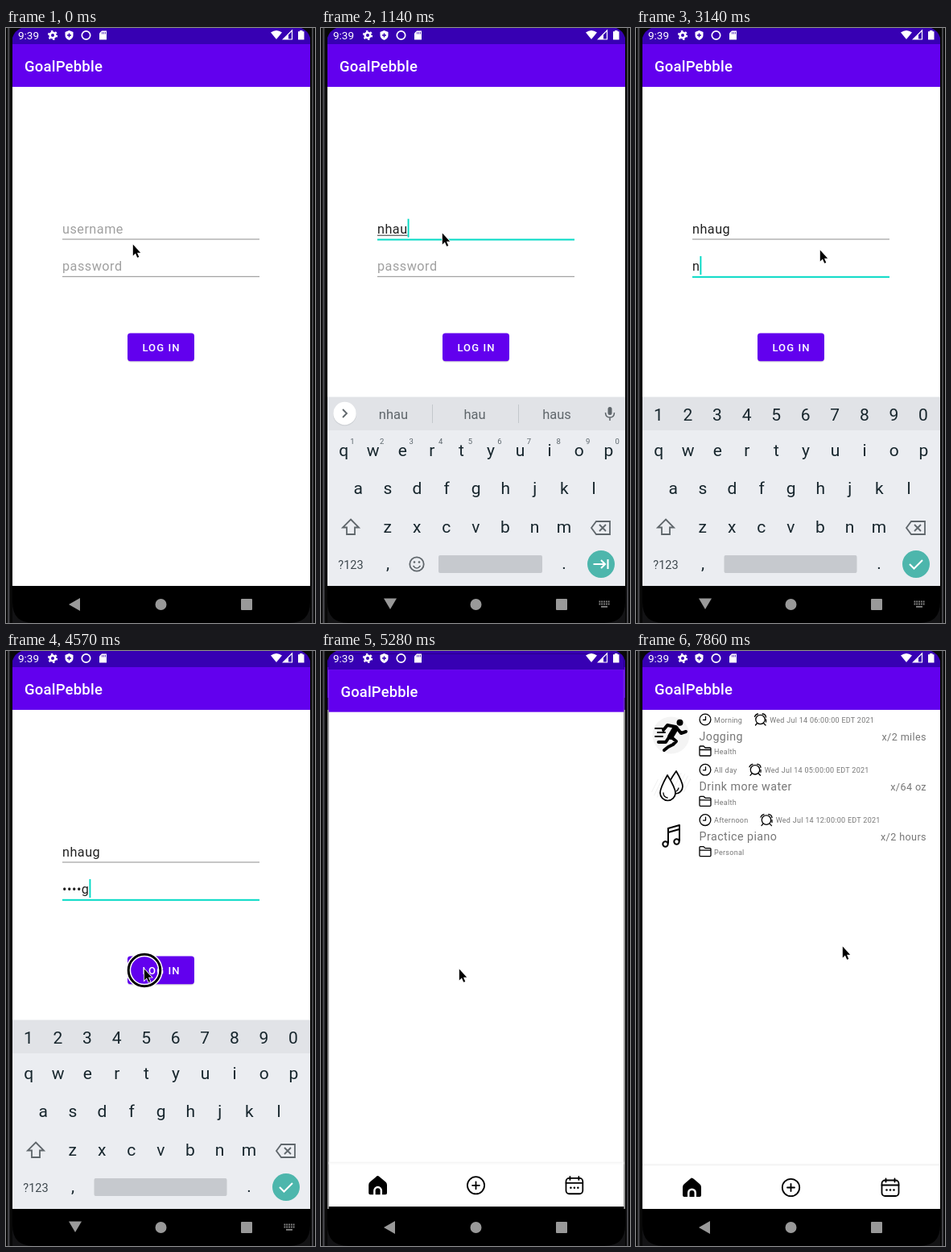
An HTML page that plays this animation: 384 px wide and 738 px high, repeating every 8000 ms.

```html
<!DOCTYPE html>
<html lang="en">
<head>
<meta charset="utf-8">
<title>Habit app</title>
<style>
html, body { margin: 0; width: 100%; height: 100%; overflow: hidden; background: #000; }
svg { display: block; width: 384px; height: 738px; font-family: Roboto, "Noto Sans", sans-serif; }
text { white-space: pre; }
.mid { text-anchor: middle; }
.end { text-anchor: end; }
.title { font-size: 18.5px; font-weight: 500; letter-spacing: .2px; fill: #fff; }
.field { font-size: 16.2px; letter-spacing: .03125em; fill: #212121; }
.hint { fill: #a0a0a0; }
.button { font-size: 13px; font-weight: 500; letter-spacing: 1.1px; fill: #fff; }
.key { font-size: 21px; fill: #17262d; }
.sup { font-size: 9.5px; fill: #5c666c; }
.word { font-size: 16.5px; fill: #5f666b; }
.small, .name, .goal { letter-spacing: .03125em; fill: #777; }
.small { font-size: 9px; }
.name { font-size: 14.25px; }
.goal { font-size: 12.6px; }
</style>
</head>
<body>
<svg id="stage" viewBox="0 0 384 738"></svg>
<script>
const APP = "GoalPebble", USER = "nhaug";
const TICKS = 56, TICK_RATE = 7;
const DARK = "#3700b3", PURPLE = "#6200ee", TEAL = "#03dac5", GREY = "#5f666b";

const tag = (name, attrs, body = "") =>
  `<${name} ${Object.entries(attrs).map(([k, v]) => `${k}="${v}"`).join(" ")}>${body}</${name}>`;
const rect = (x, y, width, height, fill, rx = 0, more = {}) =>
  tag("rect", { x, y, width, height, fill, rx, ...more });
const disc = (cx, cy, r, fill, more = {}) => tag("circle", { cx, cy, r, fill, ...more });
const path = (d, more = {}) => tag("path", { d, ...more });
const text = (x, y, cls, body, more = {}) => tag("text", { x, y, class: cls, ...more }, body);
const group = (body, more = {}) => tag("g", more, body);
const at = (x, y, body) => group(body, { transform: `translate(${x} ${y})` });
const pen = (width, stroke = "#000") => ({
  fill: "none", stroke, "stroke-width": width, "stroke-linecap": "round", "stroke-linejoin": "round",
});
const line = (d, width = 1.3, color) => path(d, pen(width, color));
const ring = (x, y, r, width = 1.3, color) => disc(x, y, r, "none", pen(width, color));
const tool = (d, width = 1.8) => path(d, { fill: "none", stroke: GREY, "stroke-width": width });

const appBar = () => rect(8, 0, 370, 20.5, DARK) + rect(8, 20, 370, 53, PURPLE)
  + text(23, 54, "title", APP);

const statusIcons = () => text(15, 13.8, "", "9:39", { "font-size": 13.5, fill: "#fff" })
  + ring(58, 9, 3.3, 2.6, "#fff")
  + disc(58, 9, 5.2, "none", { stroke: "#fff", "stroke-width": 1.8, "stroke-dasharray": "2.4 3.05" })
  + path("M78.5 3l5 2v4q0 4-5 6q-5-2-5-6V5z", { fill: "#fff" })
  + path("M78.5 6.5v5M76 9h5", { stroke: DARK, "stroke-width": 1.5 })
  + ring(99.5, 9, 5.2, 1.7, "#fff")
  + path("M119 3.5h6v11h-9V6.5z", { fill: "#fff" })
  + path("M119.5 5v2.5M121.5 5v2.5M123.5 5v2.5", { stroke: DARK, "stroke-width": .8 })
  + path("M329 5.5q7-5 14 0l-7 8.5z", { fill: "#fff" })
  + path("M355.5 3v11h-11z", { fill: "none", stroke: "#fff", "stroke-width": 1.2 })
  + path("M351 8v6h-6z", { fill: "#fff" })
  + path("M365 3h3.5v1.3h2v10.2h-7.5V4.3h2z", { fill: "#fff" });

const keyboardTools = () => at(79, 478, ring(-2, -2, 5, 1.8, GREY) + tool("M2 2L8 8"))
  + at(132, 478, tool("M-7 -7H7V3L3 7H-7zM7 3H3V7M-3 1q3 3 6 0", 1.6)
    + disc(-3, -2.5, 1, GREY) + disc(3, -2.5, 1, GREY))
  + text(185.5, 482.5, "mid", "GIF", { "font-size": 12, "font-weight": 700, fill: GREY })
  + rect(233, 471, 15, 15, "#70777c", 1)
  + path("M273.5 468V488", { stroke: "#c3c7cb" })
  + [301, 307, 313].map(x => disc(x, 478.5, 2, GREY)).join("");

const enterCircle = icon => disc(348, 665, 17, "#4db6ac")
  + path(icon, { fill: "none", stroke: "#fff", "stroke-width": 2.1 });

function keyboard(typed, secret) {
  const step = 36.58;
  const row = (keys, x, y) => [...keys].map((c, i) => text(x + i * step, y, "key mid", c)).join("");
  let out = rect(8, 457, 370, 2, "#f2f3f5") + rect(8, 458, 370, 235, "#ebedf1") + rect(8, 458, 370, 41, "#e1e3e7");
  if (secret) out += row("1234567890", 27.8, 486.5);
  else {
    out += disc(29.5, 479, 14.5, "#cfd2d6") + disc(29.5, 478, 14.2, "#fff")
      + tool(typed ? "M27 473l5 5l-5 5" : "M32 473l-5 5l5 5")
      + rect(356.5, 470, 5, 10, GREY, 2.5)
      + tool("M353.5 477q0 6 5.5 6t5.5-6M359 483v4", 1.5);
    if (typed) {
      const rest = typed.slice(1) || typed;
      [[90, typed], [191, rest], [293, rest + "s"]].forEach(([x, w]) => out += text(x, 485, "word mid", w));
      out += path("M138.5 467V490M245.5 467V490", { stroke: "#c3c7cb" });
    } else out += keyboardTools();
    out += [..."1234567890"].map((c, i) => text(39 + i * step, 515.5, "sup mid", c)).join("");
  }
  out += row("qwertyuiop", 28.1, 530.5) + row("asdfghjkl", 46.3, 577.5) + row("zxcvbnm", 82.6, 625.5)
    + tool("M37 609.5l10 10h-5v8.5h-10v-8.5h-5z")
    + tool("M336 620l6-8h17v16h-17zM346 616l8 8M354 616l-8 8")
    + text(37, 670.5, "mid", "?123", { "font-size": 14.5, fill: "#3f494f" })
    + text(83, 671, "key mid", ",") + text(302, 671, "key mid", ".");
  if (secret) out += rect(109.5, 654, 165, 22, "#c6c9ce", 2) + enterCircle("M340 665l5.5 5.5L356 660");
  else {
    out += rect(146, 654, 129, 22, "#c6c9ce", 2)
      + at(119, 665, ring(0, 0, 8.7, 1.8, GREY) + disc(-3, -2.5, 1.3, GREY) + disc(3, -2.5, 1.3, GREY)
        + tool("M-4.5 2q4.5 6 9 0", 1.5))
      + enterCircle("M338.5 665h14M348 660l5 5l-5 5M356.5 659v12");
  }
  return out;
}

const ctx = document.createElement("canvas").getContext("2d");
function measure(s) {
  ctx.font = "16.2px Roboto, 'Noto Sans', sans-serif";
  return ctx.measureText(s).width + s.length * .506;
}

function field(y, hint, value, active, caret, composing) {
  const w = measure(value);
  return text(70, y, value ? "field" : "field hint", value || hint)
    + (composing && value ? rect(70, y + 2, w, 1, "#333") : "")
    + (active ? rect(70, y + 6.8, 245, 2, TEAL) : rect(70, y + 6.8, 245, 1, "#8d8d8d"))
    + (active && caret ? rect(70 + w, y - 18, 1.9, 23, TEAL) : "");
}

const login = s => rect(8, 0, 370, 692, "#fff") + appBar()
  + field(254.7, "username", s.user, s.focus === 1, s.caret, s.focus === 1)
  + field(301, "password", s.pass, s.focus === 2, s.caret)
  + rect(151, 381, 83, 33.5, "#000", 4, { opacity: .15 }) + rect(151, 378.6, 83, 34.6, PURPLE, 3.6)
  + text(193, 401.2, "button mid", "LOG IN");

const clock = (x, y) => at(x, y, ring(0, 0, 6.9) + line("M.5 -3.5V.5H-2.5"));
const alarm = (x, y) => at(x, y, ring(0, 0, 5.7)
  + line("M-7 -3.5q1-3 4-3.5M2.5 -7q4 0 4.5 4M-4 4.5l-2 2.5M4 4.5l2.5 2.5M7 0v3"));
const folder = (x, y) => at(x, y, line("M-7 4.5V-5q0-1 1-1h4l2 2h6q1 0 1 1v8q0 1-1 1h-12q-1 0-1-1zM-7 -1.5H7"));

const runner = () => disc(43.5, 104.5, 23, "#f4f4f4") + disc(54.5, 88.8, 4, "#000")
  + line("M49 96L43 106", 7.5)
  + line("M49 94L39 92L34 98M52 97L56 102L62 100M44 107L50 112L46 116L40 119L35 123M41 107L37 113L28 113", 4)
  + line("M24 96h9M27 101h9M24 106h9", 2);

function drops() {
  let hatch = "";
  for (let i = -20; i <= 20; i += 5) {
    const h = Math.sqrt(529 - i * i) * .7;
    hatch += `M${43.5 + i - h / 2} ${167 + h}l${h} ${-2 * h}`;
  }
  const left = "M39 154q-9 16-9 22a9.5 9.5 0 0 0 19 0q0-6-10-22z";
  return path(hatch, { stroke: "#f0f0f0" })
    + line("M50 149q-10 14-10 19a9 9 0 0 0 18 0q0-5-8-19z", 1.7)
    + path(left, { fill: "#fff" }) + line(left, 1.7)
    + line("M34 176q0 5 5 6M53 170q-1 3-3 4");
}

const notes = () => line("M40 238V220L54 216V235M40 225L54 221", 2)
  + ring(36.5, 239.5, 3.2, 2) + ring(50.5, 236.5, 3.2, 2);

const HABITS = [
  ["Morning", 154.5, "06", "Jogging", "x/2 miles", "Health"],
  ["All day", 148, "05", "Drink more water", "x/64 oz", "Health"],
  ["Afternoon", 162, "12", "Practice piano", "x/2 hours", "Personal"],
];
const habitList = () => runner() + drops() + notes() + HABITS.map(([part, x, hour, name, goal, kind], i) =>
  at(0, i * 62.3, clock(86, 85) + text(97, 88.5, "small", part)
    + alarm(x, 85) + text(x + 11.7, 88.5, "small", `Wed Jul 14 ${hour}:00:00 EDT 2021`)
    + text(78.5, 110.5, "name", name) + text(361, 110.8, "goal end", goal)
    + folder(86, 124) + text(97, 128.3, "small", kind))).join("");

const home = showList => rect(8, 0, 370, 738, "#000") + rect(8, 20, 370, 672, "#fff") + appBar()
  + rect(8, 636, 370, 2, "#f5f5f5") + rect(8, 638, 370, 1, "#fafafa")
  + path("M69 653.5q1.5 0 3 1.5l7 6q2 1.5 2 4v10q0 2-2 2h-4v-5a5.5 5.5 0 0 0-11 0v5h-4q-2 0-2-2v-10q0-2.5 2-4l7-6q1.5-1.5 2-1.5z")
  + path("M66.5 677v-5a3 3 0 0 1 6 0v5z")
  + ring(192.5, 665.5, 10.7, 1.8) + line("M188 665.5h9M192.5 661v9", 1.8)
  + rect(305.5, 656.5, 21, 19.5, "none", 4, pen(1.8))
  + line("M305.5 662.5h21M310.5 654.5v4M321.5 654.5v4", 1.8)
  + [311.5, 316, 320.5].map(x => disc(x, 668.5, 1.3, "#000")).join("")
  + (showList ? habitList() : "");

const navIcons = keys => disc(192.5, 715, 7, "#999") + rect(292, 708, 14, 14, "#999", 1)
  + path(keys ? "M78 707.5h16l-8 13.5z" : "M92 707v16l-14-8z", { fill: "#999" })
  + (keys ? path("M345.5 711.5h13M345.5 714.5h13", { stroke: "#888", "stroke-width": 1.8, "stroke-dasharray": "1.8 1" })
    + path("M348 717.8h8", { stroke: "#888", "stroke-width": 1.8 }) : "");

const bezel = () => rect(0, 0, 8, 738, "#080808") + rect(2, 0, 2.5, 738, "#434347")
  + rect(378, 0, 6, 738, "#080808") + rect(380, 0, 2, 738, "#434347")
  + path("M8 0h11q-8 3-11 12zM378 0h-11q8 3 11 12z", { fill: "#080808" })
  + path("M8 712q0 26 26 26H8zM378 712q0 26-26 26h26z", { fill: "#131315" });

const pointer = ([x, y], pressed) => (pressed
  ? ring(x + 1, y + 2, 19.8, 6, "#fff") + ring(x + 1, y + 2, 19.8, 3) : "")
  + at(x, y, path("M.8 .5V14.5L3.9 11.5L6.2 16.8L8.3 15.9L6 10.7H10.2z",
    { fill: "#000", stroke: "#fff", "stroke-width": 1.6, "paint-order": "stroke" }));

// Rows are [tick, value, ...]; values are blended between rows.
function blend(rows, k) {
  const i = rows.findIndex(r => r[0] > k);
  if (i === 0) return rows[0].slice(1);
  if (i < 0) return rows[rows.length - 1].slice(1);
  const a = rows[i - 1], b = rows[i], p = (k - a[0]) / (b[0] - a[0]), e = p * p * (3 - 2 * p);
  return a.slice(1).map((v, j) => v + (b[j + 1] - v) * e);
}
const POINTER = [[0, 157, 268], [1, 152, 257], [2, 150, 254], [9, 150, 254], [13, 228, 272], [16, 228, 275],
  [25, 228, 275], [30, 171, 394], [46, 171, 394], [47, 231, 182], [49, 234, 190], [55, 256, 366]];
const DROP = [[1, 235], [2, 110], [3, 0], [33, 0], [34, 110], [35, 235]];
const WINDOW = [[34, .86, 0], [35, .93, .6], [36, .975, 1], [37, .991, 1], [38, .997, 1], [39, 1, 1]];
const PRESSES = [[1, 2], [17, 18], [31, 32]];
const USER_KEYS = [5, 6, 7, 8, 9], PASS_KEYS = [22, 23, 24, 24, 25];

const typedCount = (keys, k) => keys.filter(t => t <= k).length;

function draw(k) {
  const n = typedCount(USER_KEYS, k), m = typedCount(PASS_KEYS, k);
  const edits = [3, 17, ...USER_KEYS, ...PASS_KEYS].filter(t => t <= k);
  const state = {
    user: USER.slice(0, n),
    pass: m ? "•".repeat(m - 1) + USER[m - 1] : "",
    focus: k < 2 ? 0 : k < 17 ? 1 : 2,
    caret: ((k - Math.max(...edits)) * 1000 / TICK_RATE) % 1000 < 500,
  };
  const [drop] = blend(DROP, k), [scale, alpha] = blend(WINDOW, k);
  const keys = drop < 235;
  let out = rect(0, 0, 384, 738, "#000");
  if (scale < 1) out += login(state);
  if (keys) out += at(0, drop, keyboard(state.user, k >= 18));
  out += rect(8, 692, 370, 46, "#000");
  if (alpha > 0) out += rect(8, 58, 370, 650, "#000", 0, { opacity: .4 }) + group(home(k >= 40),
    { opacity: alpha, transform: `translate(193 369) scale(${scale}) translate(-193 -369)` });
  out += statusIcons() + navIcons(keys) + bezel()
    + pointer(blend(POINTER, k), PRESSES.some(([a, b]) => k >= a && k <= b));
  stage.innerHTML = out;
}

const stage = document.getElementById("stage");
const start = performance.now();
let shown = -1;
function loop() {
  const t = (performance.now() - start) % 8000;
  const k = Math.floor((t + 8) * TICK_RATE / 1000) % TICKS;
  if (k !== shown) draw(shown = k);
  requestAnimationFrame(loop);
}
loop();
</script>
</body>
</html>
```
